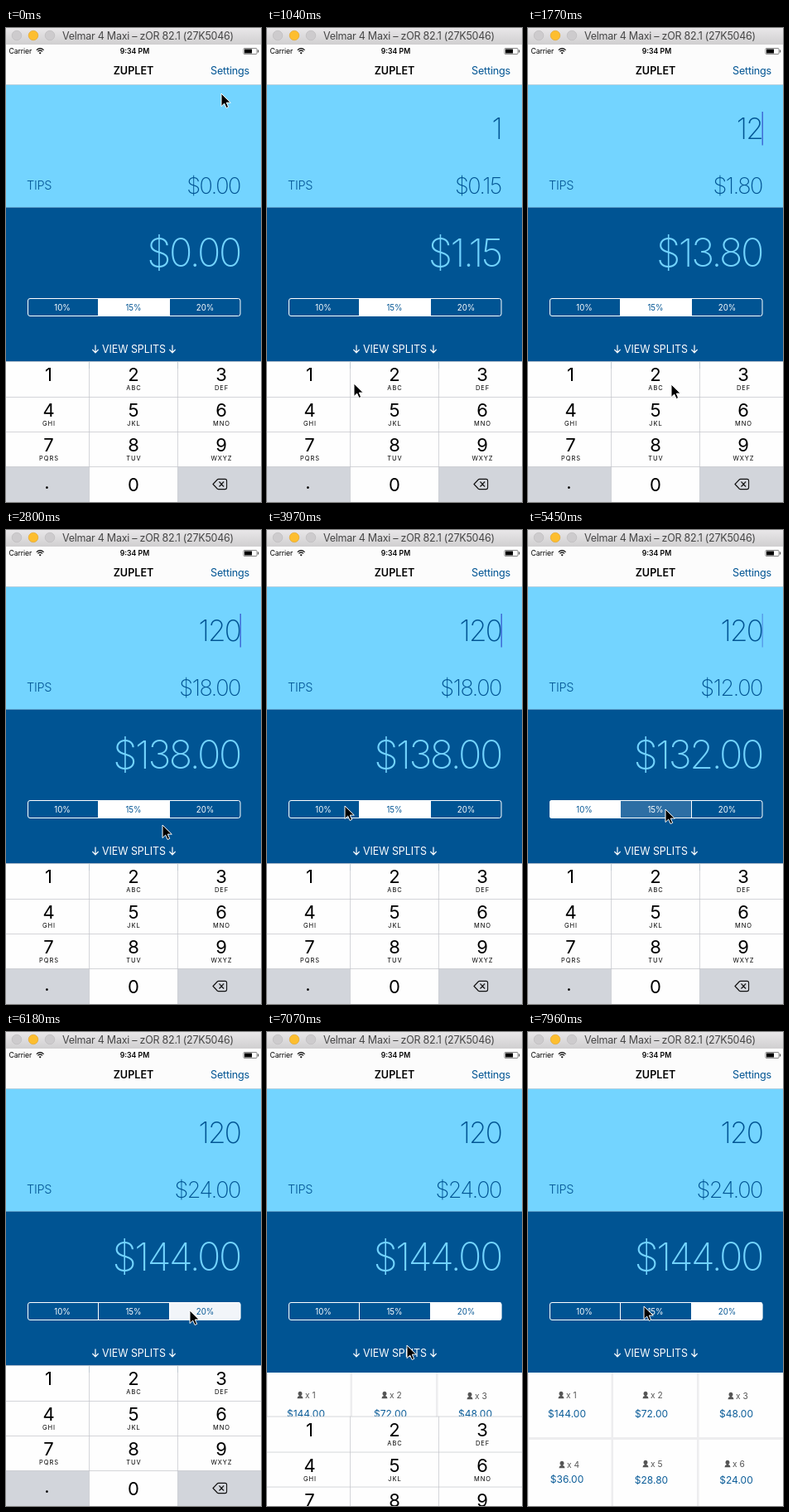
Animation of 308x572 px, one loop 8000 ms. Source, as an HTML page:

```html
<!DOCTYPE html>
<html lang="en">
<head>
<meta charset="utf-8">
<style>
html, body { margin: 0; width: 308px; height: 572px; overflow: hidden; background: #fff; }
svg { display: block; font-family: Inter, Roboto, sans-serif; font-optical-sizing: none; }
.mid { text-anchor: middle; }
.money { text-anchor: end; font-weight: 200; letter-spacing: -.052em; }
.digit { font-size: 22px; }
.letters { font-size: 7.5px; letter-spacing: .9px; }
.seg { font-size: 9.7px; }
</style>
</head>
<body>
<svg width="308" height="572" viewBox="0 0 308 572">
  <defs>
    <linearGradient id="chrome" x2="0" y2="1">
      <stop stop-color="#e9e7e9"/><stop offset="1" stop-color="#d0cfd0"/>
    </linearGradient>
    <clipPath id="pill"><rect x="26" y="326" width="257.5" height="22" rx="3"/></clipPath>
  </defs>

  <!-- window bar -->
  <rect width="308" height="20" fill="url(#chrome)"/>
  <g stroke-width=".6">
    <circle cx="13" cy="9" r="5.8" fill="#cdcbcd" stroke="#b9b7b9"/>
    <circle cx="33" cy="9" r="5.8" fill="#fdbe2f" stroke="#dfa023"/>
    <circle cx="53" cy="9" r="5.8" fill="#cdcbcd" stroke="#b9b7b9"/>
  </g>
  <text x="68" y="14" font-size="12.5" letter-spacing="-.25" fill="#454545">Velmar 4 Maxi – zOR 82.1 (27K5046)</text>

  <!-- status and navigation -->
  <rect y="20" width="308" height="48.5" fill="#fcfcfc"/>
  <text x="3.5" y="31" font-size="8.7" letter-spacing="-.1">Carrier</text>
  <g fill="none" stroke="#000" stroke-width="1.2">
    <path d="M36.8 26.6q4.4-3.8 8.8 0M38.4 28.4q2.8-2.4 5.6 0"/>
    <path d="M41.2 31.6l-1.5-1.7q1.5-1.2 3 0z" fill="#000" stroke="none"/>
  </g>
  <text class="mid" x="155.5" y="31" font-size="8.7" font-weight="600">9:34 PM</text>
  <rect x="287" y="24.5" width="16" height="7" rx="1" fill="#fff" stroke="#555" stroke-width=".7"/>
  <rect x="288" y="25.5" width="9" height="5" fill="#000"/>
  <rect x="304" y="26.5" width="1.2" height="3" fill="#555"/>
  <text class="mid" x="154" y="56" font-size="12.6" font-weight="600">ZUPLET</text>
  <text x="294" y="56" font-size="12.6" letter-spacing="-.2" text-anchor="end" fill="#005493">Settings</text>

  <!-- amounts -->
  <rect y="68.5" width="308" height="148" fill="#73d4ff"/>
  <rect y="68" width="308" height=".6" fill="#b4c4cc"/>
  <rect y="216.5" width="308" height="194.5" fill="#005493"/>
  <text x="25" y="195" font-size="14.5" font-weight="300" letter-spacing="-.3" fill="#005493">TIPS</text>
  <text id="bill" class="money" x="283" y="134" font-size="35" fill="#005493"></text>
  <text id="tip" class="money" x="283" y="200" font-size="27" fill="#005493"></text>
  <text id="total" class="money" x="283" y="288" font-size="47" fill="#73d4ff"></text>
  <rect id="caret" x="282.5" y="101" width="1.5" height="40.5" fill="#3f6bd6"/>

  <!-- rate picker -->
  <g id="rates" clip-path="url(#pill)"></g>
  <path d="M111.5 326v22M197.5 326v22" stroke="#fff"/>
  <rect x="26.5" y="326.5" width="256.5" height="21" rx="2.5" fill="none" stroke="#fff"/>
  <g id="link">
    <text class="mid" x="154.5" y="392" font-size="12.4" fill="#fff">VIEW SPLITS</text>
    <path d="M108 382.5v9m-3.6-3.5 3.6 3.8 3.6-3.8M201 382.5v9m-3.6-3.5 3.6 3.8 3.6-3.8" fill="none" stroke="#fff" stroke-width="1.2"/>
  </g>

  <g id="splits"></g>
  <g id="pad"></g>
  <path id="arrow" d="M0 0V15.6l3.7-3.5 2.4 5.4 2.6-1.1-2.4-5.3H11.3Z" fill="#000" stroke="#fff" stroke-linejoin="round"/>
</svg>

<script>
const $ = id => document.getElementById(id);
const LOOP = 8000, STEP = 147.3;
const clamp = v => Math.max(0, Math.min(1, v));
const text = (cls, x, y, s, extra = '') => `<text class="mid ${cls}" x="${x}" y="${y}" ${extra}>${s}</text>`;
const rect = (x, y, w, h, fill, id = '') => `<rect id="${id}" x="${x}" y="${y}" width="${w}" height="${h}" fill="${fill}"/>`;

// Rate segments
const segX = [26, 111.5, 197.5, 283.5], rates = [10, 15, 20];
$('rates').innerHTML = rates.map((r, i) =>
  rect(segX[i], 326, segX[i + 1] - segX[i], 22, '#005493', 'seg' + i) +
  text('seg', [68, 154, 240.5][i], 340.5, r + '%', `id="rate${i}"`)).join('');

// Per-person cells: icon x, icon y, amount x, amount baseline
const cells = [[40, 438, 47, 465], [142, 438, 149, 465], [245, 439, 251.5, 465],
               [41, 522, 47, 544], [142, 521, 149, 545], [241, 521, 251.5, 545]];
$('splits').innerHTML = rect(0, 411, 308, 161, '#ededef') + cells.map(([x, y, ax, ay], i) =>
  rect([1, 103, 206.5][i % 3], i < 3 ? 411 : 492, [99.5, 101, 101.5][i % 3], i < 3 ? 78 : 80, '#fefefe') +
  `<path d="M${x - 3.5} ${y + 4.2}q0-2.6 2.6-3.2a2.5 2.7 0 1 1 1.8 0q2.6.6 2.6 3.2z" fill="#555"/>` +
  `<text x="${x + 6}" y="${y + 4}" font-size="10.2" fill="#555">x ${i + 1}</text>` +
  text('', ax, ay, '', `id="share${i}" font-size="12" fill="#0a5c98"`)).join('');

// Number pad
const colX = [0, 100.5, 207.5, 308], rowY = [402.5, 445.5, 487.5, 529.5, 572], midX = [51.5, 154, 260];
const letters = ['', 'ABC', 'DEF', 'GHI', 'JKL', 'MNO', 'PQRS', 'TUV', 'WXYZ'];
const GREY = '#d2d5db', WHITE = '#fefefe';
let pad = '';
for (let i = 0; i < 12; i++) {
  const c = i % 3, r = i / 3 | 0, x = colX[c], y = rowY[r];
  pad += rect(x, y, colX[c + 1] - x, rowY[r + 1] - y, i == 9 || i == 11 ? GREY : WHITE, 'key' + (i == 10 ? 0 : i + 1));
  if (r < 3) pad += text('digit', midX[c], y + 23.5, i + 1) + text('letters', midX[c] + .5, y + 34.5, letters[i]);
}
pad += text('digit', 49.5, 556, '.') + text('digit', midX[1], 558.5, 0) +
  `<path d="M0 402.5H308M0 445.5H308M0 487.5H308M0 529.5H308M100.5 402.5V572M207.5 402.5V572" stroke="#c3c5ca" stroke-width=".7"/>
   <path d="M250 550.5l5.2-5.5q.6-.6 1.4-.6h8q2 0 2 2v8.200q0 2-2 2h-8q-.8 0-1.400-.6zM257.500 547.500l5.600 6m0-6-5.600 6" fill="none" stroke="#111" stroke-width="1.1" stroke-linejoin="round"/>`;
$('pad').innerHTML = pad;

// Pointer path: step, x, y
const path = [[1, 260, 79], [2, 238, 125], [3, 150, 290], [4, 76, 408], [5, 62, 428], [6, 64, 428],
  [7, 105, 429], [8, 158, 430], [9, 173, 430], [12, 173, 430], [13, 171, 460], [14, 163, 525], [15, 160, 545],
  [17, 160, 545], [18, 179, 440], [19, 189, 356], [22, 187, 355], [25, 110, 336], [27, 78, 330],
  [32, 79, 331], [35, 150, 335], [37, 166, 337], [38, 167, 337], [40, 222, 336], [43, 222, 336],
  [44, 220, 341], [46, 170, 377], [48, 169, 378], [51, 167, 361], [52, 165, 359], [53, 154, 346], [54, 140, 331]];
function pointer(k) {
  const n = path.findIndex(p => p[0] >= k);
  if (n < 1) return path[0].slice(1);
  const [k0, x0, y0] = path[n - 1], [k1, x1, y1] = path[n], u = (k - k0) / (k1 - k0);
  return [x0 + (x1 - x0) * u, y0 + (y1 - y0) * u];
}

// Latest value in a list of [step, value]
const at = (list, k) => list.filter(e => e[0] <= k).pop()[1];
const bills = [[0, 0], [5, 1], [9, 12], [16, 120]];
const picks = [[0, 1], [28, 0], [38, 1], [41, 2]];
const presses = { 5: 1, 9: 2, 16: 0 };
const holds = { 27: 0, 37: 1, 40: 2 };

function draw(now) {
  const k = Math.min(54, Math.floor((now % LOOP + 6) / STEP)), t = k * STEP;
  const bill = at(bills, k), pick = at(picks, k), tip = bill * rates[pick] / 100;
  const money = v => '$' + v.toFixed(2);
  $('bill').textContent = bill || '';
  $('tip').textContent = money(tip);
  $('total').textContent = money(bill + tip);
  cells.forEach((_, i) => $('share' + i).textContent = money((bill + tip) / (i + 1)));

  rates.forEach((_, i) => {
    const fresh = i == 2 && (k == 41 || k == 42);
    $('seg' + i).setAttribute('fill', i == pick ? (fresh ? '#f2f5f9' : '#fff') : holds[k] === i ? '#2d6ea4' : '#005493');
    $('rate' + i).setAttribute('fill', i == pick ? '#005493' : '#fff');
  });
  for (let d = 0; d < 10; d++) $('key' + d).setAttribute('fill', presses[k] === d ? GREY : WHITE);

  const p = t % 1000;
  $('caret').setAttribute('opacity', k < 48 ? clamp(Math.min((p - 380) / 140, (1040 - p) / 140)) : 0);
  $('link').setAttribute('opacity', k == 47 ? .3 : 1);
  const slide = 1 - (1 - clamp((k - 47.5) / 2.500)) ** 2;
  $('pad').setAttribute('transform', `translate(0 ${slide * 171})`);
  $('arrow').setAttribute('transform', `translate(${pointer(k)})`);
}

let start;
function tick(now) {
  start ??= now;
  draw(now - start);
  requestAnimationFrame(tick);
}
draw(0);
requestAnimationFrame(tick);
</script>
</body>
</html>
```
